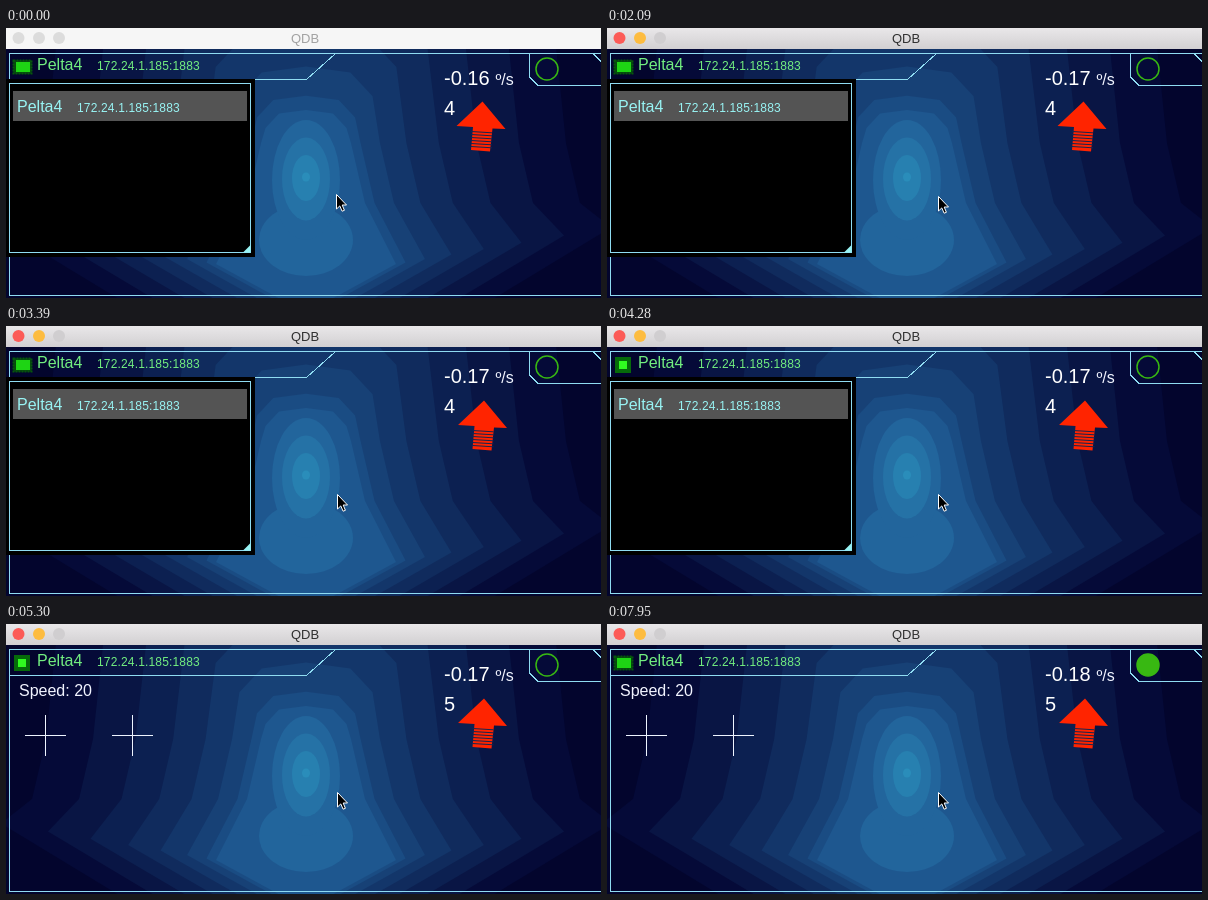
An HTML page for the animation above (8 s loop, 595 by 270 pixels).

```html
<!DOCTYPE html>
<html lang="en">
<head>
<meta charset="utf-8">
<title>QDB</title>
<style>
  html, body { margin: 0; width: 595px; height: 270px; overflow: hidden; background: #03052d; }
  svg { display: block; font-family: "Liberation Sans", Arial, sans-serif; }
  .line { fill: none; stroke: #8fdcf2; stroke-width: 1; shape-rendering: crispEdges; }
  .big { font-size: 20px; fill: #fff; }
  .mid { font-size: 16px; }
  .small { font-size: 12px; letter-spacing: .16px; }
  .green { fill: #72ee80; }
  .aqua { fill: #98f3f3; }
  .white { fill: #f2f4ff; }
</style>
</head>
<body>
<svg width="595" height="270" viewBox="0 0 595 270">
  <defs>
    <linearGradient id="metal" x2="0" y2="1">
      <stop stop-color="#e9e7e9"/><stop offset="1" stop-color="#d2d0d2"/>
    </linearGradient>
  </defs>

  <rect width="595" height="270" fill="#03052d"/>
  <g id="glow"></g>

  <g class="line">
    <path d="M595 25.5H3.5V267.5H595"/>
    <path d="M3.5 51.5H300.500L329.500 25.500"/>
    <path d="M523.5 25.5V49L532 57.5H595M587 25.500L595 33.500"/>
  </g>

  <g id="bar">
    <rect id="barFill" width="595" height="21"/>
    <circle cx="12.500" cy="10" r="6"/>
    <circle cx="33" cy="10" r="6"/>
    <circle cx="53" cy="10" r="6"/>
    <text id="title" x="299" y="15" font-size="13" text-anchor="middle">QDB</text>
  </g>

  <g id="chip">
    <rect x="7.500" y="32.500" width="18" height="13" fill="#06480c" stroke="#06580c" stroke-width="2" stroke-dasharray="2 1"/>
    <rect x="10" y="34" width="14" height="10" fill="#1ed414"/>
  </g>
  <g id="lamp">
    <rect x="8" y="31" width="16" height="16" fill="#066a0a"/>
    <rect x="12" y="35" width="8" height="8" fill="#30fa20"/>
  </g>
  <g class="green">
    <text class="mid" x="31" y="42">Pelta4</text>
    <text class="small" x="91" y="42">172.24.1.185:1883</text>
  </g>

  <circle id="badge" cx="541" cy="41" r="11" stroke="#38b812" stroke-width="1.500"/>

  <text id="rate" class="big" x="438" y="57"></text>
  <text class="mid white" x="489.500" y="57">º/s</text>
  <text id="heading" class="big" x="438" y="87"></text>

  <g id="arrow">
    <path d="M476.500 73.500L499.500 101L486.500 100.500L484 123.500L465 122L467 99L450.500 98Z" fill="#ff2400"/>
    <g id="stripes" stroke="#152650"></g>
  </g>

  <g id="controls">
    <text class="mid white" x="13" y="72">Speed: 20</text>
    <path d="M19 111.500H60M39.500 91V132M106 111.500H147M126.500 91V132" fill="none" stroke="#eef4ff"/>
  </g>

  <g id="panel">
    <rect y="51" width="249" height="178"/>
    <rect class="line" x="3.500" y="55.500" width="241" height="169"/>
    <path d="M237 224.500L244.500 217V224.500Z" fill="#98f3f3"/>
    <rect x="7" y="63" width="234" height="30" fill="#545454"/>
    <g class="aqua">
      <text class="mid" x="11" y="84">Pelta4</text>
      <text class="small" x="71" y="84">172.24.1.185:1883</text>
    </g>
  </g>

  <path id="cursor" d="M0 0V14.500L3.300 11.400L5.600 16.700L7.900 15.800L5.700 10.500H10Z" fill="#000" stroke="#fff"/>
</svg>

<script>
const $ = id => document.getElementById(id);
const LOOP = 8000;
const FIRST = 150, ACTIVE = 2080, TURN = 3240, CLOSE = 4420, FIVE = 5160, FILL = 7800;
const MID = 300;

function add(parent, tag, attrs) {
  const el = document.createElementNS("http://www.w3.org/2000/svg", tag);
  for (const key in attrs) el.setAttribute(key, attrs[key]);
  parent.append(el);
}

function mix(from, to, u) {
  return `rgb(${from.map((c, i) => Math.round(c + (to[i] - c) * u))})`;
}

// A bell that flares below the waist, then folds back in to its foot.
function addBell(waist, fill) {
  const grow = waist - 45;
  const top = 82 - 1.5 * grow;
  const hem = waist + 45;
  const half = [
    [0, top], [.6 * waist, top + .08 * waist], [.9 * waist, top + .4 * waist],
    [waist, 115], [waist + 14, 175], [hem, 236 - .17 * grow], [.75 * hem - 40, 270]
  ];
  const mirrored = half.map(([x, y]) => [-x, y]).reverse();
  const points = [...half, ...mirrored].map(([x, y]) => [MID + x, y]);
  add($("glow"), "polygon", { points: points.join(" "), fill });
}

function addOval(cy, rx, ry, fill) {
  add($("glow"), "ellipse", { cx: MID, cy, rx, ry, fill });
}

function buildGlow() {
  const night = [5, 10, 56], sea = [30, 87, 143], pool = [34, 101, 156], core = [42, 141, 186];
  for (let i = 0; i < 8; i++) {
    const u = i / 7;
    addBell(45 + 215 * (1 - u) ** 1.6, mix(night, sea, u));
  }
  addOval(212, 47, 36, mix(pool, core, 0));
  for (let i = 0; i < 4; i++) {
    addOval(152 - i, 34 - 10 * i, 60 - 18.5 * i, mix(pool, core, i / 3));
  }
}

function buildStripes() {
  for (let y = 104; y < 122; y += 3) {
    add($("stripes"), "path", { d: `M465 ${y - .5}L486 ${y + .8}` });
  }
}

function show(id, on) {
  $(id).style.display = on ? "" : "none";
}

// Hundredths of a degree per second, drifting slowly around 17.
function rateAt(t) {
  if (t < FIRST) return 16;
  return Math.round(17.3 + .6 * Math.cos(2 * Math.PI * (t - 500) / 6600));
}

const lights = ["#fc5b57", "#fdbc40", "#d0ced0"];
const dots = document.querySelectorAll("#bar circle");

function draw(t) {
  const active = t >= ACTIVE;
  $("barFill").setAttribute("fill", active ? "url(#metal)" : "#f6f6f6");
  $("title").setAttribute("fill", active ? "#303030" : "#a2a2a2");
  dots.forEach((dot, i) => dot.setAttribute("fill", active ? lights[i] : "#dcdcdc"));
  $("cursor").setAttribute("transform", active ? "translate(331.500 168.500)" : "translate(330.500 166.500)");

  const lit = (t + 900) % 1500 < 900;
  show("lamp", lit);
  show("chip", !lit);
  show("panel", t < CLOSE);
  show("controls", t >= CLOSE);

  $("rate").textContent = "-0." + rateAt(t);
  $("heading").textContent = t < FIVE ? "4" : "5";
  $("arrow").setAttribute("transform", t < TURN ? "" : "translate(1.500 1)");
  $("badge").setAttribute("fill", t < FILL ? "none" : "#38b812");
}

buildGlow();
buildStripes();
const begin = performance.now();
function tick() {
  draw((performance.now() - begin) % LOOP);
  requestAnimationFrame(tick);
}
tick();
</script>
</body>
</html>
```
